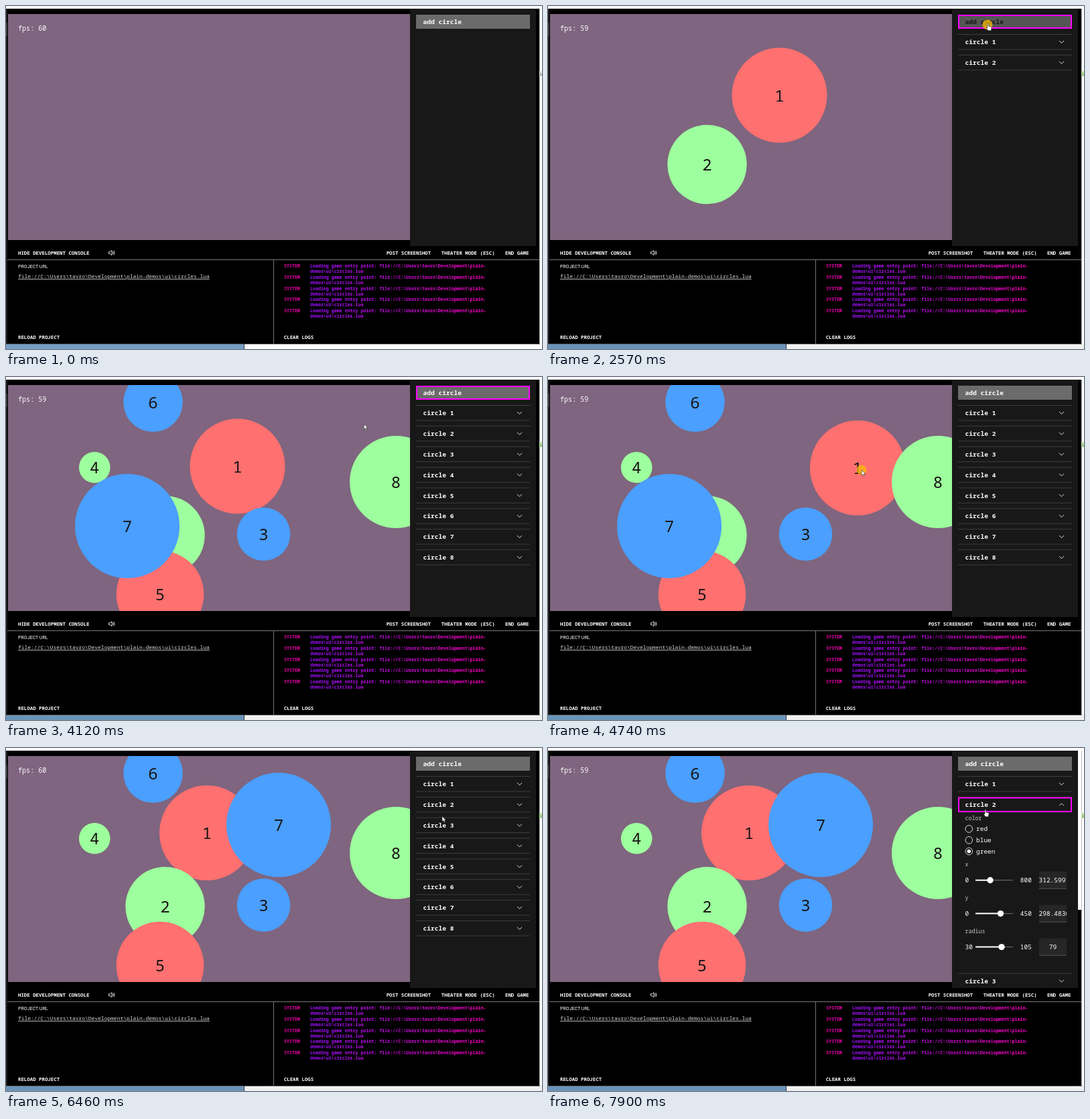
Write an HTML page that moves like this. It is 800 by 513 pixels and loops after 8000 ms.

```html
<!DOCTYPE html>
<html lang="en">
<head>
<meta charset="utf-8">
<title>Circle playground</title>
<style>
  html, body { margin: 0; width: 100%; height: 100%; overflow: hidden; background: #fff; }
  svg { display: block; width: 100vw; height: 100vh; }
  text { font-family: "Noto Sans Mono", "DejaVu Sans Mono", monospace; fill: #fff; white-space: pre; }
  .bar { font-size: 7.4px; font-weight: 700; }
  .log { font-size: 6.63px; font-weight: 600; }
  .row { font-size: 9.58px; font-weight: 600; }
  .field { font-size: 9.5px; font-weight: 500; }
  .label { font-size: 8.3px; fill: #c8c8c8; }
  .digit { font-size: 24px; font-weight: 500; fill: #181414; text-anchor: middle; }
  .line { stroke: #3c3c3c; }
  .icon { fill: none; stroke: #ddd; }
  .focus { fill: none; stroke: #f0f; stroke-width: 2; }
</style>
</head>
<body>
<svg viewBox="0 0 800 513" preserveAspectRatio="none">
  <defs>
    <clipPath id="stage"><rect x="3" y="12" width="600" height="338"/></clipPath>
    <clipPath id="side"><rect x="603" y="4" width="193" height="355"/></clipPath>
    <clipPath id="boxes"><rect x="733" y="180" width="41" height="140"/></clipPath>
    <linearGradient id="ink" gradientUnits="userSpaceOnUse" x1="454" y1="0" x2="717" y2="0">
      <stop offset="0" stop-color="#9d10ff"/><stop offset="1" stop-color="#ff00c0"/>
    </linearGradient>
  </defs>

  <rect width="800" height="513" fill="#fff"/>
  <rect y="4" width="3" height="509" fill="#1c1c1c"/>
  <rect y="25" width="3" height="20" fill="#3a3a3a"/>
  <rect id="desk" y="505" width="356" height="8"/>
  <rect id="sheet" x="356" y="505" width="444" height="8"/>
  <rect x="796" y="4" width="1" height="502" fill="#bbb"/>
  <rect y="505" width="797" height="1" fill="#555"/>
  <rect x="355" y="505" width="1" height="8" fill="#333"/>
  <g id="edge">
    <rect x="796" y="97" width="4" height="8"/>
    <text x="796" y="104" font-size="7">i</text>
  </g>
  <rect x="2" y="4" width="794" height="501" fill="#000"/>

  <g clip-path="url(#stage)">
    <rect x="3" y="12" width="600" height="338" fill="#7f657f"/>
    <g id="circles"></g>
  </g>
  <text id="fps" x="18" y="37" font-size="10.1"></text>

  <g clip-path="url(#side)">
    <rect x="603" y="4" width="188" height="355" fill="#181818"/>
    <rect id="button" x="612" y="13" width="170" height="21"/>
    <text id="add" class="row" x="622.5" y="27">add circle</text>
    <rect id="buttonFocus" class="focus" x="613" y="14" width="168" height="19"/>
    <g id="rows"></g>
    <g id="details"></g>
    <rect id="rowFocus" class="focus" x="613" y="74.5" width="168" height="20.5"/>
    <rect id="thumb" x="791" y="4" width="5" height="238" fill="#fff"/>
  </g>

  <g id="console"></g>

  <circle id="press" r="7.5" fill="#ffbf00" opacity=".72"/>
  <g id="pointer" stroke="#222" stroke-width=".6" fill="#fff">
    <path id="arrow" d="M0 0V8L1.9 6.4 3.2 9.4 4.5 8.8 3.2 6H5.6Z"/>
    <path id="hand" d="M0 1Q1 -.4 1.8 1V4.2L5.4 5Q6.2 5.2 6 6.5L5.3 10.8H.8L-1.8 6.8Q-1.6 5.6 0 6.8Z"/>
  </g>
</svg>
<script>
const $ = id => document.getElementById(id);
const LOOP = 8000;

const text = (cls, x, y, str, extra = '') => `<text class="${cls}" x="${x}" y="${y}" ${extra}>${str}</text>`;
const show = (id, on) => $(id).style.display = on ? '' : 'none';

// Bursts of activity: start, end, number of steps
const bursts = [
  [220, 460, 4], [620, 690, 2], [1700, 2020, 5], [2160, 2960, 11], [3040, 3500, 7],
  [3810, 4590, 11], [4680, 4680, 1], [4740, 5440, 10], [5520, 6070, 8], [6220, 6460, 4],
  [6860, 7140, 5], [7300, 7450, 3], [7900, 7900, 1]
];

// Pointer path: time, x, y
const path = [
  [220, 727, 498], [300, 706, 390], [380, 672, 250], [460, 653, 180], [690, 653, 180],
  [1700, 667, 139], [1780, 671, 105], [1860, 668, 66], [2020, 656, 26], [3888, 656, 26],
  [4278, 351.5, 136.5], [4434, 395, 150], [4590, 430, 145], [4740, 468, 139],
  [4890, 445, 196], [5050, 362, 180], [5206, 306, 130], [5440, 182, 210], [5598, 182, 210],
  [5756, 300, 148], [5912, 408, 102], [6070, 543, 103], [6220, 580, 104], [6460, 651, 102],
  [6860, 652, 98], [7000, 653, 92], [7450, 653, 92], [7900, 652, 92]
];

const RED = '#ff7070', GREEN = '#9eff9e', BLUE = '#4a9fff';
// Circles in order of creation, with the time each one appears
const circles = [
  { x: 345.5, y: 133.5, r: 71, fill: RED, born: 2240, drag: [4278, 5206] },
  { x: 237.5, y: 237, r: 59.2, fill: GREEN, born: 2480 },
  { x: 384.5, y: 235, r: 39.8, fill: BLUE, born: 2720 },
  { x: 132.2, y: 135.3, r: 23.3, fill: GREEN, born: 2960 },
  { x: 230, y: 325, r: 65.3, fill: RED, born: 3110 },
  { x: 219.5, y: 37.8, r: 44.3, fill: BLUE, born: 3265 },
  { x: 181, y: 223, r: 78, fill: BLUE, born: 3495, drag: [5598, 5912] },
  { x: 582, y: 157, r: 69, fill: GREEN, born: 3880 }
];

const EXPAND = 7300, SHIFT = 233, PITCH = 30.85;

function snap(t) {
  let held = 0;
  for (const [start, end, steps] of bursts) {
    if (t < start) break;
    const gap = steps > 1 ? (end - start) / (steps - 1) : 1;
    held = start + gap * Math.min(steps - 1, Math.floor((t - start) / gap + 1e-6));
  }
  return held;
}

function pointerAt(t) {
  const next = path.findIndex(p => p[0] > t);
  if (next < 0) return path.at(-1).slice(1);
  if (next === 0) return path[0].slice(1);
  const [t0, x0, y0] = path[next - 1], [t1, x1, y1] = path[next];
  const k = (t - t0) / (t1 - t0);
  return [x0 + (x1 - x0) * k, y0 + (y1 - y0) * k];
}

function dragOffset([start, end], t) {
  const [x0, y0] = pointerAt(start);
  const [x, y] = pointerAt(Math.min(end, Math.max(start, t)));
  return [x - x0, y - y0];
}

function buildCircles() {
  $('circles').innerHTML = circles.map((c, i) =>
    `<g id="circle${i}"><circle cx="${c.x}" cy="${c.y}" r="${c.r}" fill="${c.fill}"/>` +
    text('digit', c.x, c.y + 9, i + 1) + '</g>').join('');
}

function buildRows() {
  $('rows').innerHTML = circles.map((c, i) => {
    const y = i * PITCH;
    return `<g id="row${i}"><path class="line" d="M612 ${y + 42.5}h170M612 ${y + 65}h170"/>` +
      text('row', 622.5, y + 57.2, 'circle ' + (i + 1)) +
      `<path id="chevron${i}" class="icon" d="M763 ${y + 52}l3.5 3.5 3.5 -3.5"/></g>`;
  }).join('');
}

function buildDetails() {
  const radio = (name, y, on) =>
    `<circle class="icon" cx="628.3" cy="${y}" r="5.3"/>` +
    (on ? `<circle cx="628.3" cy="${y}" r="2.8" fill="#fff"/>` : '') +
    text('field', 639, y + 3.3, name);
  const slider = (name, y, min, max, knob, value, centred) =>
    text('label', 622.5, y - 20.5, name) + text('field', 622.5, y + 3.4, min) +
    `<path d="M638 ${y}H694" stroke="#777"/><path d="M638 ${y}H${knob}" stroke="#fff" stroke-width="2"/>` +
    `<circle cx="${knob}" cy="${y}" r="4.7" fill="#fff"/>` + text('field', 704.8, y + 3.4, max) +
    `<rect x="733" y="${y - 13}" width="41" height="25" fill="#262626"/>` +
    `<path d="M733 ${y + 12.5}h41" stroke="#5a5a5a"/><g clip-path="url(#boxes)">` +
    text('field', centred ? 753.5 : 732.5, y + 3.4, value, centred ? 'text-anchor="middle"' : '') + '</g>';
  $('details').innerHTML = text('label', 622.5, 107.5, 'color') +
    radio('red', 121) + radio('blue', 137.8) + radio('green', 154.5, true) +
    slider('x', 197.7, 0, 800, 660, '312.5991') +
    slider('y', 247.6, 0, 450, 675.5, '298.4836') +
    slider('radius', 297.6, 30, 105, 677, '79', true);
}

function buildConsole() {
  const folder = String.raw`file://C:\Users\tavro\Development\plain-`;
  const file = String.raw`demos\ui\circles.lua`;
  const log = i => {
    const y = 391.3 + i * 16.7;
    return text('log', 415, y, 'SYSTEM', 'style="fill:#e800a8"') +
      text('log', 454, y, 'Loading game entry point: ' + folder, 'style="fill:url(#ink)"') +
      text('log', 454, y + 7.8, file, 'style="fill:url(#ink)"');
  };
  $('console').innerHTML =
    '<path d="M2 379.5H796M399.5 379.5V505" stroke="#777"/>' +
    text('bar', 18, 372, 'HIDE DEVELOPMENT CONSOLE') +
    '<path class="icon" d="M153.5 367.7h2l2.5 -2v7l-2.5 -2h-2zM159.5 367.5q1.2 1.7 0 3.4M160.8 366q2.2 3.2 0 6.4"/>' +
    text('bar', 567.7, 372, 'POST SCREENSHOT') +
    text('bar', 649.8, 372, 'THEATER MODE (ESC)') +
    text('bar', 745, 372, 'END GAME') +
    text('', 18, 392, 'PROJECT URL', 'style="font:7.05px Roboto,sans-serif"') +
    text('', 18, 407, folder + file, 'style="font-size:7.95px;fill:#ddd;text-decoration:underline"') +
    text('bar', 18, 498, 'RELOAD PROJECT') +
    text('bar', 414.8, 498, 'CLEAR LOGS') +
    [0, 1, 2, 3, 4].map(log).join('');
}

function drawPage(t) {
  const settled = t >= 620;
  $('desk').setAttribute('fill', settled ? '#6b94ba' : '#759fc6');
  $('sheet').setAttribute('fill', settled ? '#f0f0f0' : '#fff');
  $('edge').children[0].setAttribute('fill', settled ? '#d2efbc' : '#fff');
  $('edge').children[1].style.fill = settled ? '#2f7d1c' : '#111';
  const slow = (t >= 1780 && t < 5598) || t >= 6900;
  $('fps').textContent = 'fps: ' + (slow ? 59 : 60);
}

function drawCircles(t) {
  const open = t >= EXPAND;
  circles.forEach((c, i) => {
    const [dx, dy] = c.drag ? dragOffset(c.drag, t) : [0, 0];
    show('circle' + i, t >= c.born);
    show('row' + i, t >= c.born);
    $('circle' + i).setAttribute('transform', `translate(${dx} ${dy})`);
    $('row' + i).setAttribute('transform', `translate(0 ${open && i > 1 ? SHIFT : 0})`);
  });
  const y = PITCH + 52;
  $('chevron1').setAttribute('d', open ? `M763 ${y + 3.5}l3.5 -3.5 3.5 3.5` : `M763 ${y}l3.5 3.5 3.5 -3.5`);
  show('details', open);
  show('thumb', open);
  show('rowFocus', t >= 7130);
}

function drawPointer(t) {
  const clicking = circles.some(c => t >= c.born - 160 && t < c.born);
  const dragging = circles.some(c => c.drag && t >= c.drag[0] && t < c.drag[1]);
  const opening = t >= 7130 && t < EXPAND;
  $('button').setAttribute('fill', clicking ? '#555' : '#6b6b6b');
  $('add').style.fill = clicking ? '#161616' : '#fff';
  show('buttonFocus', t >= 2160 && t < circles[0].drag[0]);

  const [x, y] = pointerAt(t);
  const overLink = (t >= 2020 && t < 3960) || t >= 6900;
  show('pointer', t >= 220);
  show('arrow', !overLink);
  show('hand', overLink);
  $('pointer').setAttribute('transform', `translate(${x} ${y})`);
  show('press', clicking || dragging || opening);
  $('press').setAttribute('transform', `translate(${x} ${y + (overLink ? 2 : 0)})`);
}

function frame() {
  const t = snap(performance.now() % LOOP);
  drawPage(t);
  drawCircles(t);
  drawPointer(t);
  requestAnimationFrame(frame);
}

buildCircles();
buildRows();
buildDetails();
buildConsole();
frame();
</script>
</body>
</html>
```
